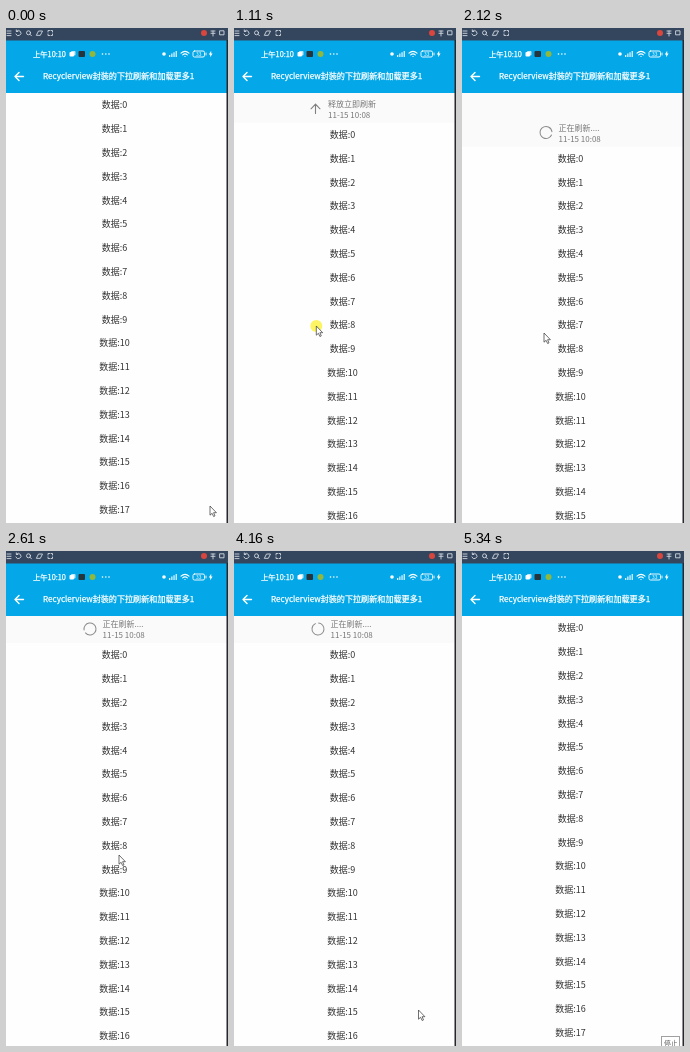
An HTML page for the animation above (5470 ms loop, 222 px wide and 495 px high).

```html
<!DOCTYPE html>
<html lang="zh">
<head>
<meta charset="utf-8">
<style>
  html, body { margin: 0; width: 100%; height: 100%; overflow: hidden; background: #fff; }
  svg { display: block; font-family: "Noto Sans CJK SC", "Noto Sans CJK", sans-serif; }
  .line { fill: none; stroke-linecap: round; stroke-linejoin: round; }
  .bold { stroke: #fff; stroke-width: .25; }
</style>
</head>
<body>
<svg width="222" height="495" viewBox="0 0 222 495">
  <rect width="222" height="495" fill="#fefefe"/>

  <rect id="headerBack" y="65" width="221" height="0" fill="#fafafa"/>
  <g id="header" fill="#777" font-size="8">
    <text id="status" y="49"></text>
    <text id="stamp" y="60">11-15 10:08</text>
    <path id="arrow" class="line" stroke="#808080" stroke-width="1.1" d="M0 4.8V-4.6M-4.5 0L0-4.6L4.5 0"/>
    <circle id="ring" class="line" r="6" stroke="#8a8a8a" pathLength="100" stroke-dasharray="91 9"/>
  </g>
  <g id="rows" fill="#333" font-size="9" text-anchor="middle"></g>

  <!-- App bar -->
  <rect y="12" width="222" height="53" fill="#04a8e8"/>
  <g fill="#fff">
    <text class="bold" x="27" y="28.8" font-size="7.3">上午10:10</text>
    <text class="bold" x="37" y="51.3" font-size="8.1">Recyclerview封装的下拉刷新和加载更多1</text>
    <rect x="63.5" y="24" width="4.5" height="4.5" rx="1"/>
    <rect x="65" y="23" width="4.5" height="4.5" rx="1" opacity=".75"/>
    <rect x="72.5" y="23" width="6.5" height="6" rx="1" fill="#26343c"/>
    <circle cx="86.5" cy="26" r="3" fill="#8fb83c"/>
    <circle cx="96.5" cy="26" r=".8"/><circle cx="99.8" cy="26" r=".8"/><circle cx="103" cy="26" r=".8"/>
    <circle cx="158" cy="26" r="1.8"/>
    <path d="M163 29v-2h1.3v2zM165.200 29v-3.400h1.300v3.400zM167.400 29v-4.700h1.300v4.700zM169.600 29v-6h1.300v6z" opacity=".85"/>
    <path d="M202.800 26.600l2.400-3.800v2.700h1.400l-2.400 3.800v-2.700z"/>
    <text x="190" y="27.900" font-size="5">33</text>
  </g>
  <g class="line" stroke="#fff">
    <path d="M175 25.200q4-3.800 8 0M176.700 26.900q2.300-2 4.600 0M178.900 28.500h.2" stroke-width="1.1"/>
    <rect x="187" y="23" width="11.500" height="6" rx="1.500" stroke-width=".9"/>
    <path d="M200 25v2" stroke-width=".9"/>
    <path d="M17.500 48.500H9M13 44.500l-4 4l4 4" stroke-width="1.400"/>
  </g>

  <!-- Window toolbar -->
  <rect width="222" height="12.500" fill="#34465e"/>
  <g class="line" stroke="#d3d9e0" stroke-width=".9">
    <path d="M1 3h4M1 5.300h4M1 7.600h4M10.500 3.200a2.600 2.600 0 1 1-.6 2.800M10.300 1.900v1.600h1.600"/>
    <circle cx="22.500" cy="4.800" r="2"/>
    <path d="M24 6.300l1.500 1.500M30.500 7l2-4h4l-2 4zM42 4V2.500h1.500M45 2.500h1.500V4M46.500 6v1.500H45M43.500 7.500H42V6"/>
    <path d="M205 3h4M205 5.300h4M207 3v5M214 2.800h4v4h-4z"/>
  </g>
  <circle cx="198" cy="5" r="3" fill="#d9463e"/>
  <rect x="220.500" y="12" width="1.500" height="483" fill="#25292e"/>

  <g id="tip">
    <rect x="199.500" y="485.500" width="18" height="12" fill="#fff" stroke="#a0a0a0"/>
    <text x="202" y="494.500" font-size="6.800" fill="#555">停止</text>
  </g>
  <g id="cursor">
    <circle id="press" r="6" fill="#fcf462"/>
    <path d="M0 0V9.200L2.100 7.300L3.600 10.500L5 9.900L3.600 6.700H6.400Z" fill="#fff" stroke="#333" stroke-width=".7"/>
  </g>
</svg>
<script>
const LOOP = 5470, STEP = 70, ROW = 23.8, HEADER = 27;
const $ = id => document.getElementById(id);
const show = (id, on) => $(id).setAttribute("visibility", on ? "visible" : "hidden");
const place = (id, x, y, turn = 0) =>
  $(id).setAttribute("transform", `translate(${x} ${y}) rotate(${turn})`);

// Eased 0 to 1 between two times
function ramp(t, from, to) {
  const u = Math.min(1, Math.max(0, (t - from) / (to - from)));
  return u * u * (3 - 2 * u);
}

const ticks = [0, 480, 1910, 3070, 3670, 5270];

const home = { x: 204, y: 478 };
const moves = [
  { from: 0, to: 480, x: 97, y: 154 },
  { from: 760, to: 1215, x: 80, y: 320.5 },
  { from: 1910, to: 2120, x: 82, y: 305 },
  { from: 2120, to: 2610, x: 113, y: 304 },
  { from: 2610, to: 3010, x: 131, y: 349 },
  { from: 3070, to: 4160, x: 184.5, y: 459 },
  { from: 4230, to: 4510, x: 209, y: 482 },
  { from: 4790, to: 5130, x: 214, y: 496 }
];

function cursorAt(t) {
  return moves.reduce((p, m) => {
    const f = ramp(t, m.from, m.to);
    return { x: p.x + (m.x - p.x) * f, y: p.y + (m.y - p.y) * f };
  }, home);
}

for (let i = 0; i < 19; i++) {
  const label = document.createElementNS("http://www.w3.org/2000/svg", "text");
  label.textContent = "数据:" + i;
  label.setAttribute("x", 108.5);
  label.setAttribute("y", 80.3 + ROW * i);
  $("rows").append(label);
}

function draw(now) {
  const time = now % LOOP;
  const start = ticks.findLast(s => s <= time);
  const t = start + Math.floor((time - start) / STEP) * STEP;

  // Drag, settle, snap to the header, close
  const offset = 52 * ramp(t, 770, 1390) + 1.5 * ramp(t, 1390, 1590)
    - (53.5 - HEADER) * ramp(t, 2120, 2400) - HEADER * ramp(t, 4230, 4510);
  const refreshing = t >= 2040 && t < 4230, done = t >= 4230;
  place("rows", 0, offset);
  place("header", 0, offset);
  $("headerBack").setAttribute("height", Math.max(0, offset));
  show("header", offset > 0.1);

  $("status").textContent = done ? "刷新完成" : refreshing ? "正在刷新...."
    : offset > HEADER ? "释放立即刷新" : "下拉刷新";
  const left = refreshing || done ? 96.5 : 94;
  $("status").setAttribute("x", left);
  $("stamp").setAttribute("x", left);
  $("arrow").style.display = refreshing || done ? "none" : "";
  $("ring").style.display = refreshing ? "" : "none";
  place("arrow", 81.5, 51, 180 * (1 - ramp(t, 930, 1100)));
  place("ring", 84, 51, (t - 2040) * 0.3);

  const { x, y } = cursorAt(t);
  place("cursor", x, y);
  show("cursor", t < 5130);
  show("press", t >= 760 && t < 1910);
  show("tip", t >= 5270);
  $("tip").setAttribute("opacity", t < 5340 ? 0.5 : 1);
  requestAnimationFrame(draw);
}
requestAnimationFrame(draw);
</script>
</body>
</html>
```
